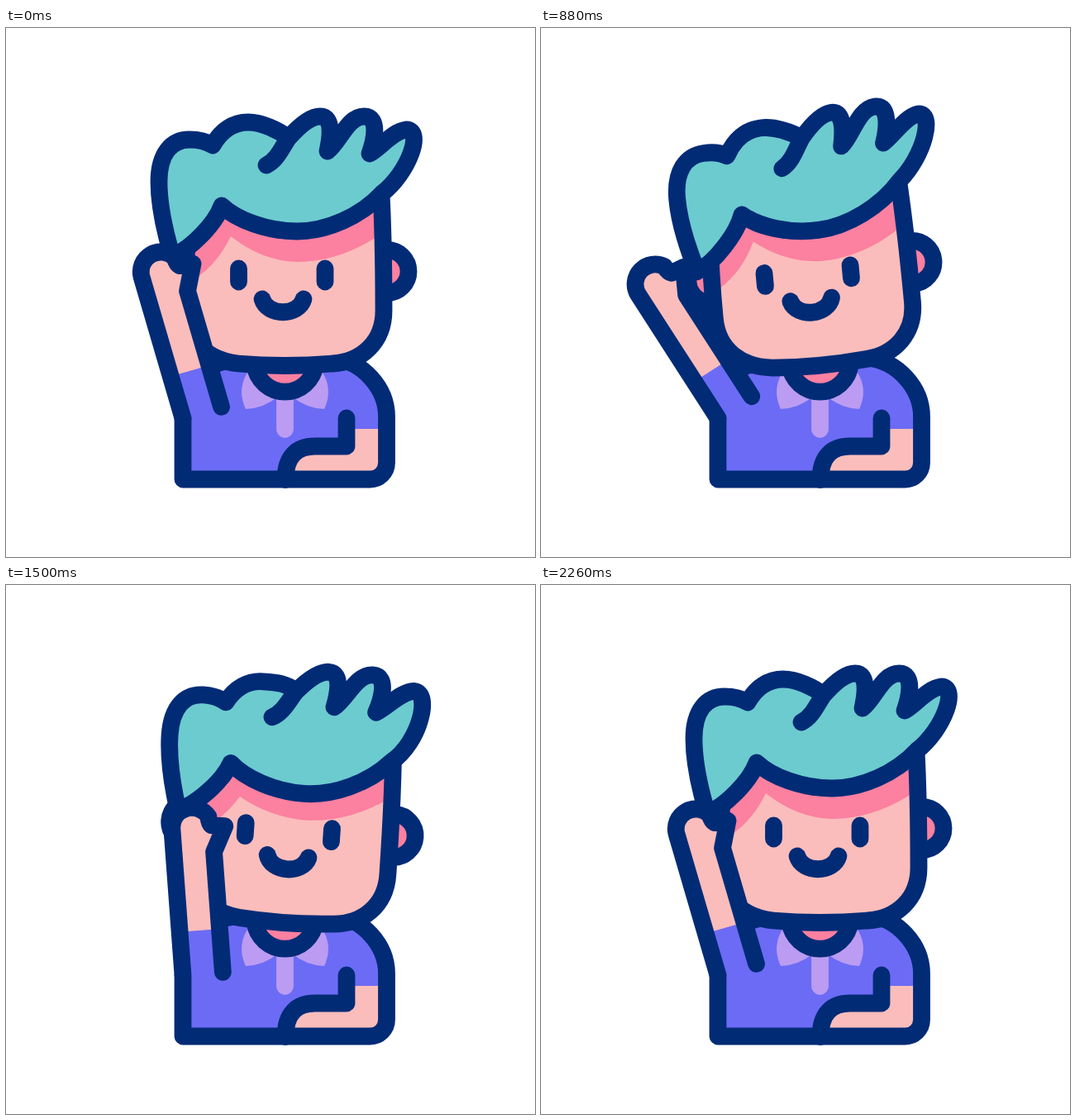
These frames come from a looping animation (640 px wide and 640 px high, 2.4 s). An HTML page:

```html
<!DOCTYPE html>
<html lang="en">
<head>
<meta charset="utf-8">
<title>Waving boy</title>
<style>
  html, body { margin: 0; width: 100%; height: 100%; overflow: hidden; background: #fff; }
  svg { display: block; width: 100vw; height: 100vh; }
  .line { fill: none; stroke: #022b76; stroke-width: 20.8; stroke-linecap: round; stroke-linejoin: round; }
  .skin { fill: #fbbdbb; }
  .pink { fill: #fc80a0; }
  .shirt { fill: #6c6bf5; }
  .collar { fill: #bb9cf2; }
  .placket { stroke: #bb9cf2; }
  .hair { fill: #6ccbcf; }
</style>
</head>
<body>
<svg viewBox="0 0 640 640">
  <defs>
    <path id="faceShape" d="M454 200C456 240 457 300 457 342C457 380 430 404 395 406Q337 411 281 406C245 402 217 380 217 340C217 300 218 260 222 220Z"/>
    <clipPath id="faceClip"><use href="#faceShape"/></clipPath>
  </defs>

  <g id="body">
    <path class="shirt" d="M214 546V472L250 408L285 400H395C432 403 460 436 460 470V546Z"/>
    <path class="skin" d="M338 546C338 518 352 506 374 506H412V485H460V526L440 546Z"/>
    <path id="collarLeaf" class="collar" d="M297 410C282 428 283 446 290 461Q312 460 329 446Z"/>
    <use href="#collarLeaf" transform="matrix(-1 0 0 1 675 0)"/>
    <path class="line placket" d="M337.500 444V485.500"/>
    <path class="line pink" d="M301 408A36.800 36.800 0 0 0 374 408"/>
    <path class="line" d="M285 400Q262 402 246 410"/>
    <path class="line" d="M395 399C432 403 460.500 436 460.500 470V526A20 20 0 0 1 440 546H214V472"/>
    <path class="line" d="M338 546.500C338 518 352 506 374 506H412V472"/>
  </g>

  <g id="head">
    <circle class="line pink" cx="215" cy="294.500" r="26"/>
    <circle class="line pink" cx="461" cy="294.500" r="26"/>
    <use class="skin" href="#faceShape"/>
    <path id="shadow" class="pink" clip-path="url(#faceClip)"/>
    <use class="line" href="#faceShape"/>
    <path id="eyes" class="line"/>
    <path class="line" d="M310 328C316 349 354 349 360 328"/>
  </g>

  <path id="hair" class="line hair"/>

  <g id="arm">
    <path class="skin" d="M0 -50V-178A24 24 0 0 1 45 -189L48 -178L64 -176L48.500 -146V-50Z"/>
    <path class="shirt" d="M0 -52.500H48V2H0Z"/>
    <path class="line" d="M0 0V-178A24 24 0 0 1 45 -189Q45 -181 48 -178L64 -176L48.500 -146V0"/>
  </g>
</svg>
<script>
const LOOP = 2400;
const $ = id => document.getElementById(id);
const clamp = v => Math.min(1, Math.max(0, v));
const smooth = u => u * u * (3 - 2 * u);

// Wave position: -1 is fully left, 0 is rest.
function waveAt(t) {
  if (t < 985) return -smooth(clamp((t - 380) / 605) ** 1.13);
  if (t < 1640) return -1 + 1.88 * smooth((t - 985) / 655);
  return 0.88 * smooth(clamp((2260 - t) / 620) ** 1.33);
}

function blinkAt(t) {
  const bump = mid => smooth(clamp(1 - Math.abs(t - mid) / 130));
  return bump(700) + bump(1920);
}

// The front locks are drawn relative to one root point, so they slide as a group.
function hairPath(slideX, slideY) {
  const front = (x, y) => `${x + slideX} ${y + slideY}`;
  return `M201 276C192 246 185 216 185 186C185 152 200 135 222 135C234 135 242 137 250 142
    C260 124 275 114 293 114C310 114 ${front(330, 124)} ${front(342, 133)}
    c14 -16 27 -26 38 -26c17 0 12 28 9 42
    c14 -10 24 -42 44 -42c20 0 12 31 7 45
    c14 -8 28 -27 44 -29
    C${front(506, 123)} 487 175 455 200
    C429 228 388 246 352 246C316 246 279 232 261 215C253 237 223 268 201 276Z
    M${front(315, 166)}c13 -6 19 -22 27 -33`;
}

function draw(t) {
  const wave = waveAt(t);
  const left = Math.min(0, wave), right = Math.max(0, wave);
  const headTurn = `rotate(${5.9 * wave} 335 418)`;
  $("head").setAttribute("transform", headTurn);
  $("arm").setAttribute("transform", `translate(214 472) rotate(${-16.3 + 18.3 * wave})`);

  const top = 291 + 9.5 * blinkAt(t);
  $("eyes").setAttribute("d", `M281.500 ${top}V307M386 ${top}V307`);

  const peak = 252 + 12 * right;
  $("shadow").setAttribute("d",
    `M460 245Q407 283 352 283Q310 282 272 ${peak}Q255 287 227 304L210 310V190H470Z`);

  // Hair bends further than the head to the left and lags behind to the right.
  $("hair").setAttribute("d", hairPath(-12 * right, -15 * right));
  $("hair").setAttribute("transform",
    `translate(${-4.5 * right} ${7.5 * right}) ${headTurn} translate(335) skewY(${2.7 * left}) translate(-335)`);
}

const start = performance.now();
function tick() {
  const t = (performance.now() - start) % LOOP;
  draw(Math.floor(t / 20) * 20);
  requestAnimationFrame(tick);
}
tick();
</script>
</body>
</html>
```
